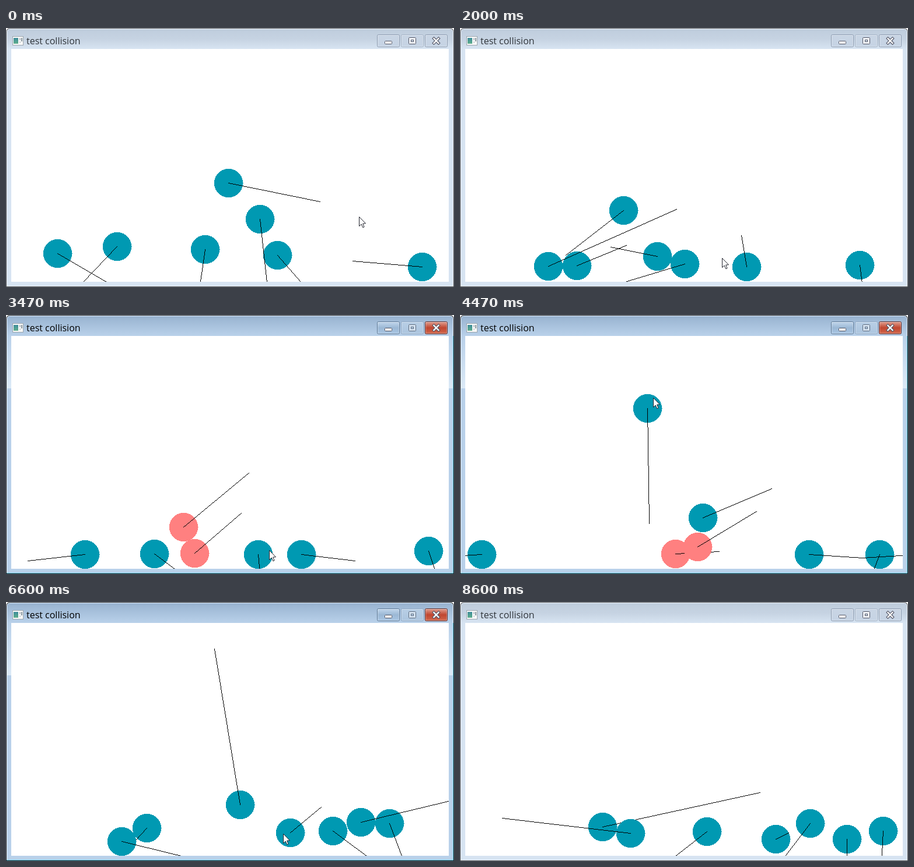
Write an HTML page with a canvas that moves like this. It is 768 px wide and 445 px high and loops after 8670 ms.

```html
<!DOCTYPE html>
<html lang="en">
<head>
<meta charset="utf-8">
<title>test collision</title>
<style>
html, body { margin: 0; width: 100%; height: 100%; overflow: hidden; background: #fff; }
canvas { display: block; }
</style>
</head>
<body>
<canvas id="stage" width="768" height="445"></canvas>
<script>
const ctx = document.getElementById('stage').getContext('2d');
const LOOP = 8670, FPS = 15, LAST = 129;
const LEFT = 9, TOP = 36, W = 750, H = 400, FLOOR = 411, G = 960;
const TEAL = '#0099b2', RED = '#ff8080';

const mix = (a, b, s) => a + (b - a) * s;
const clamp = (v, a, b) => Math.max(a, Math.min(b, v));
const smooth = s => { s = clamp(s, 0, 1); return s * s * (3 - 2 * s); };
const near = d => d - W * Math.round(d / W);

// Ball states. A missing vx means the ball travels evenly to its next place.
const free = (x, y, vy, vx) => ({ x, y, vx, vy });
const roll = (x, vx) => ({ x, y: FLOOR, vx, vy: x ? 11 : 6 });
// Falling, with the speed line leaving the window at x = cut.
const drop = (x, y, cut = x) => ({ x, y, vx: (cut - x) * 1.35, vy: (TOP + H - y) * 1.35 });
const sink = (x, cut) => drop(x, FLOOR, cut);
const goOn = () => roll();

const acts = [];
const act = (start, ...balls) => acts.push({ start, balls });

act(0, drop(465, 390, 505), free(713, 410, -10, -119), free(381, 266, 32, 157),
  drop(341, 380, 333), drop(190, 375, 132), drop(88, 387, 172), drop(435, 328, 447));
act(30, free(338, 392, -16, -80), drop(385, 405, 282), drop(685, 407, 689),
  free(280, 313, 77), free(200, 408, -35, 85), free(151, 409, -98, 220), free(491, 410, -54, -9));
act(52, drop(254, 410, 289), free(323, 409, -69, 80), drop(724, 405, 734),
  roll(135, -98), roll(506, 92), free(304, 364, -93), sink(432, 434));
act(67, free(369, 410, -4, 75), free(407, 398, -61, 101), sink(719, 709),
  goOn(), goOn(), free(416, 348, -50, 118), free(321, 160, 198));
act(88, roll(455), free(518, 407, -22), roll(726, 116),
  roll(153, 88), drop(667, 401, 711), drop(607, 392, 583), free(325, 202, 149, 3));
act(110, drop(526, 377, 569), free(665, 321, 90, -25), free(173, 395, -229, -295),
  drop(351, 407, 492), free(720, 348, -61, 240), free(675, 393, -151, 189), free(407, 374, 24, -92));
act(LAST, drop(663, 407), drop(600, 380, 557), free(541, 407, -11, 22),
  drop(423, 394, 369), free(244, 386, -59, 270), drop(725, 393, 723), free(292, 397, -26, -220));

const span = i => (acts[i + 1].start - acts[i].start) / FPS;
acts.forEach(({ balls }, i) => balls.forEach((b, j) => {
  if (b.x !== undefined) return;
  const p = acts[i - 1].balls[j];
  b.x = p.x + p.vx * span(i - 1);
  b.vx = p.vx;
}));
acts.forEach(({ balls }, i) => balls.forEach((b, j) => {
  if (b.vx === undefined) b.vx = near(acts[i + 1].balls[j].x - b.x) / span(i);
}));

const HITS = { 52: [1, 5], 67: [0, 1] };
const HELD = { ball: 6, start: 52, free: 0.8, x: 320, y: 140 };
const POINTER = [[0, 605, 324], [30, 449, 395], [44, 451, 404], [53, 451, 404], [64, 331, 142],
  [67, 331, 142], [88, 512, 415], [110, 437, 381], [122, 439, 419], [125, 440, 460]];

// Fall and bounce for t seconds; returns height and speed.
function fly(y, v, t, bounce) {
  while (t > 0) {
    const hit = Math.sqrt(v * v + 2 * G * Math.max(0, FLOOR - y));
    const wait = (hit - v) / G;
    if (t < wait) return [y + v * t + G * t * t / 2, v + G * t];
    t -= wait;
    y = FLOOR;
    v = -bounce * hit;
    if (v > -40) return [FLOOR, 10];
  }
  return [y, v];
}

// Index of the last entry, but one, whose time has come.
function current(list, n, time) {
  let i = 0;
  while (i < list.length - 2 && n >= time(list[i + 1])) i++;
  return i;
}

// Places before contact: forward flight melts into the flight that arrives.
function flights(n, i) {
  const T = span(i), t = (n - acts[i].start) / FPS;
  return acts[i].balls.map((p, j) => {
    const q = acts[i + 1].balls[j];
    const guess = p.x + (p.vx + q.vx) / 2 * T;
    const endX = q.x + W * Math.round((guess - q.x) / W);
    let s = smooth(t / T);
    if (acts[i].start === HELD.start && j === HELD.ball && t > 0) {
      if (t < HELD.free) {
        const u = smooth((t - 0.067) / (HELD.free - 0.067));
        return [mix(p.x, HELD.x, u), mix(p.y, HELD.y, u), 3, 10];
      }
      s = 1;
    }
    const a = fly(p.y, p.vy, t, 0.9);
    const b = fly(q.y, -q.vy, T - t, 0.97);
    return [mix(p.x + p.vx * t, endX - q.vx * (T - t), s), mix(a[0], b[0], s),
            mix(p.vx, q.vx, s), mix(a[1], -b[1], s)];
  });
}

function eachPair(balls, fn) {
  for (let i = 0; i < balls.length; i++)
    for (let j = 0; j < i; j++) {
      const a = balls[i], b = balls[j];
      const dx = near(a[0] - b[0]), dy = a[1] - b[1];
      fn(i, j, dx, dy, Math.hypot(dx, dy) || 1);
    }
}

function scene(n) {
  const i = current(acts, n, a => a.start);
  const start = acts[i].start, end = acts[i + 1].start;
  const balls = flights(n, i);
  const red = new Set(HITS[n] || []);
  if (n > start && n < end) {
    const before = {};
    eachPair(flights(n - 1, i), (a, b, dx, dy, d) => { before[a + '-' + b] = d; });
    eachPair(balls, (a, b, dx, dy, d) => {
      if (d < 47 && before[a + '-' + b] >= 47) red.add(a).add(b);
    });
  }
  const weight = clamp(Math.min(n - start, end - n) / 3, 0, 1);
  for (let k = 0; weight > 0 && k < 6; k++)
    eachPair(balls, (a, b, dx, dy, d) => {
      const push = Math.max(0, 49 - d) / 2 * weight / d;
      balls[a][0] += dx * push;
      balls[b][0] -= dx * push;
      balls[a][1] = Math.min(FLOOR, balls[a][1] + dy * push);
      balls[b][1] = Math.min(FLOOR, balls[b][1] - dy * push);
    });
  return { balls, red };
}

function rect(x, y, w, h, fill) {
  ctx.fillStyle = fill;
  ctx.fillRect(x, y, w, h);
}

function outline(x, y, w, h, color) {
  ctx.strokeStyle = color;
  ctx.lineWidth = 1;
  ctx.strokeRect(x + 0.5, y + 0.5, w - 1, h - 1);
}

function rounded(x, y, w, h, r, fill, edge) {
  ctx.beginPath();
  ctx.roundRect(x, y, w, h, r);
  if (fill) {
    ctx.fillStyle = fill;
    ctx.fill();
  }
  if (edge) {
    ctx.strokeStyle = edge;
    ctx.lineWidth = 1;
    ctx.stroke();
  }
}

function shade(y0, y1, ...colors) {
  const g = ctx.createLinearGradient(0, y0, 0, y1);
  colors.forEach((c, i) => g.addColorStop(i / (colors.length - 1), c));
  return g;
}

function disc(x, y, color) {
  ctx.fillStyle = color;
  for (let dy = -24; dy <= 24; dy++) {
    const half = Math.floor(Math.sqrt(24.6 * 24.6 - dy * dy));
    ctx.fillRect(x - half, y + dy, 2 * half + 1, 1);
  }
  ctx.fillRect(x + 25, y, 1, 1);
}

function line(x, y, dx, dy) {
  const steps = Math.max(1, Math.abs(dx), Math.abs(dy));
  ctx.fillStyle = '#000';
  for (let k = 0; k <= steps; k++)
    ctx.fillRect(Math.round(x + dx * k / steps), Math.round(y + dy * k / steps), 1, 1);
}

function button(x, fill, edge) {
  rounded(x + 0.5, 11.5, 38, 21, 2, fill, edge);
  rounded(x + 1.5, 12.5, 36, 19, 1, null, 'rgba(255,255,255,.35)');
}

function cross(width, color) {
  ctx.strokeStyle = color;
  ctx.lineWidth = width;
  ctx.beginPath();
  ctx.moveTo(733.5, 18); ctx.lineTo(741.5, 26);
  ctx.moveTo(741.5, 18); ctx.lineTo(733.5, 26);
  ctx.stroke();
}

function chrome(active) {
  const body = active ? '#b9d1ea' : '#d7e4f2';
  rect(0, 0, 768, 445, '#fff');
  [active ? '#1c2126' : '#4c4f54', active ? '#eaf3fc' : '#eef4fa', body].forEach((c, i) =>
    rounded(i, i, 768 - 2 * i, 445 - 2 * i, [7 - i, 7 - i, 0, 0], c));
  rounded(2, 2, 764, 34, [5, 5, 0, 0],
    active ? shade(2, 36, '#98b3d0', body) : shade(2, 36, '#bfcddd', '#c6d3e2', body));
  if (active) {
    const glow = shade(36, 126, body, '#dceaf7');
    rect(2, 36, 7, 90, glow);
    rect(759, 36, 7, 90, glow);
    rect(766, 36, 1, 408, '#6fd6ef');
    rect(1, 443, 766, 1, '#6fd6ef');
  }

  rect(11, 14, 19, 16, '#fafafa');
  outline(11, 14, 19, 16, '#9aa5ad');
  rect(13, 17, 8, 10, shade(17, 27, '#3f8d9c', '#5fae8c'));
  rect(23, 17, 2, 4, '#b9bec4');
  rect(26, 17, 2, 6, '#8c9aa2');
  rect(23, 23, 2, 3, '#d0d4d8');

  ctx.font = '16px "Open Sans", "Noto Sans", sans-serif';
  ctx.fillStyle = active ? '#000' : '#30353b';
  ctx.fillText('test collision', 35, 28);

  const edge = active ? '#5c7896' : '#8c9bb0';
  const pale = active ? shade(11, 33, '#b9cfe6', '#abc4de') : shade(11, 33, '#c9d5e4', '#c5d3e4');
  button(636, active ? shade(11, 33, '#c5d9ee', '#9bb8d5', '#a9c6e4') : pale, edge);
  button(677, pale, active ? '#8ba5c2' : '#a3b2c5');
  button(718, active ? shade(11, 33, '#e3a596', '#c04630', '#d2694d') : pale, active ? '#5b2a2a' : edge);

  const ink = '#535666', dim = active ? '#5f6d80' : ink;
  rounded(649.5, 22.5, 12, 5, 1, '#fff', ink);
  rounded(690.5, 16.5, 12, 11, 1, active ? '#d3e1ef' : '#f2f5f9', dim);
  rect(694, 20, 5, 4, body);
  outline(694, 20, 5, 4, dim);
  ctx.lineCap = 'square';
  cross(4.6, ink);
  cross(2.4, '#fff');
  ctx.lineCap = 'butt';
  rect(LEFT, TOP, W, H, '#fff');
}

function pointer(n) {
  const i = current(POINTER, n, p => p[0]);
  const a = POINTER[i], b = POINTER[i + 1];
  const s = smooth((n - a[0]) / (b[0] - a[0]));
  ctx.save();
  ctx.translate(Math.round(mix(a[1], b[1], s)) + 0.5, Math.round(mix(a[2], b[2], s)) + 0.5);
  ctx.fillStyle = '#fff';
  ctx.strokeStyle = '#20222c';
  ctx.lineWidth = 1;
  const arrow = new Path2D('M0 0V16L3.7 12.6 6.3 18.3 8.6 17.3 6.2 11.6 11 11.3Z');
  ctx.fill(arrow);
  ctx.stroke(arrow);
  ctx.restore();
}

function draw(n) {
  chrome(n >= 45 && n < 126);
  ctx.save();
  ctx.beginPath();
  ctx.rect(LEFT, TOP, W, H);
  ctx.clip();
  const { balls, red } = scene(n);
  balls.forEach((ball, i) => {
    const [px, y, vx, vy] = ball.map(Math.round);
    const x = LEFT + (((px - LEFT) % W) + W) % W;
    const copies = [x - W, x, x + W];
    copies.forEach(cx => disc(cx, y, red.has(i) ? RED : TEAL));
    copies.forEach(cx => line(cx, y, vx, vy));
  });
  ctx.restore();
  pointer(n);
}

// Steps fall on whole hundredths of a second.
const stepTime = n => Math.round(n * 100 / FPS) * 10;
let shown = -1;
function tick() {
  const t = performance.now() % LOOP;
  let n = Math.min(LAST, Math.floor(t * FPS / 1000) + 1);
  while (n > 0 && stepTime(n) > t) n--;
  if (n !== shown) draw(shown = n);
  requestAnimationFrame(tick);
}
tick();
</script>
</body>
</html>
```
